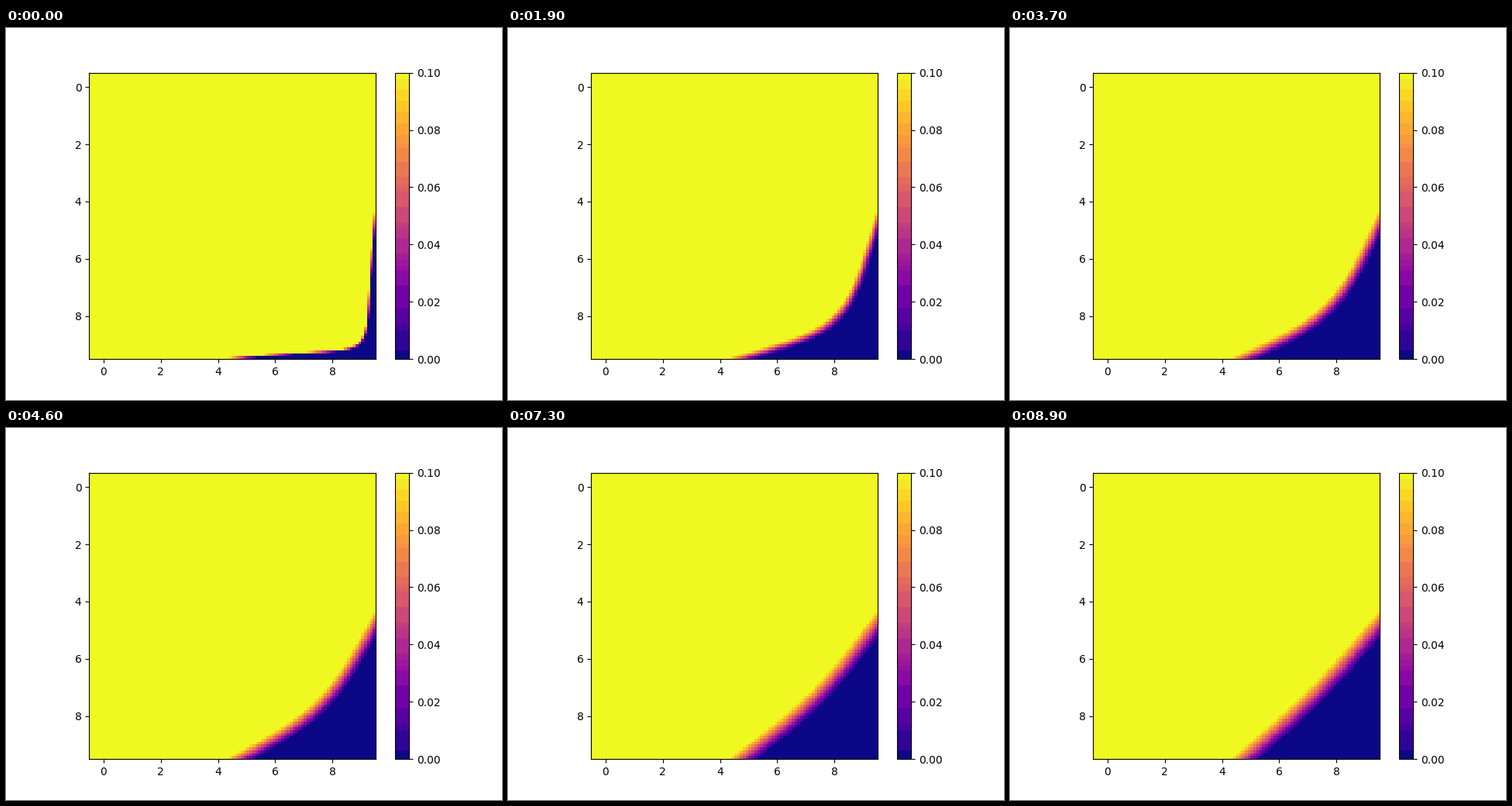
Animation of 640x480 px, one loop 9 s. Source, as a matplotlib script:

```python
import numpy as np
import matplotlib.pyplot as plt
from matplotlib.animation import FuncAnimation
from matplotlib.colors import ListedColormap

N = 100          # grid cells per side
FRAMES = 90
RATE = 11.75     # diffusion per frame, in cells squared
START = 2        # frames of diffusion already done at the start


def stepped_plasma():
    """Plasma reduced to flat bands: 3 bits red, 4 bits green, 3 bits blue."""
    rgb = (plt.get_cmap("plasma")(np.arange(256))[:, :3] * 255).astype(int)
    _, band = np.unique(rgb >> [5, 4, 5], axis=0, return_inverse=True)
    band = band.ravel()
    out = np.array([rgb[band == b].mean(axis=0) for b in band])
    out[band == band[0]] = rgb[0]
    out[band == band[-1]] = rgb[-1]
    return ListedColormap(out / 255)


# Fixed walls at cos(x + y), interior starting at 1
axis = np.arange(N) / N
walls = np.cos(axis[:, None] + axis[None, :])
walls[1:-1, 1:-1] = 0

# Heat equation solved in the eigenbasis of the interior Laplacian
n = N - 2
lap = 2 * np.eye(n) - np.eye(n, k=1) - np.eye(n, k=-1)
lam, vec = np.linalg.eigh(lap)
decay = lam[:, None] + lam[None, :]
inflow = (walls[:-2, 1:-1] + walls[2:, 1:-1]
          + walls[1:-1, :-2] + walls[1:-1, 2:])
steady = vec.T @ inflow @ vec / decay
excess = vec.T @ np.ones((n, n)) @ vec - steady


def field(frame):
    t = RATE * (frame + START)
    u = walls.copy()
    u[1:-1, 1:-1] = vec @ (steady + excess * np.exp(-decay * t)) @ vec.T
    return u


fig, ax = plt.subplots(figsize=(6.4, 4.8), dpi=100)
image = ax.imshow(field(0), cmap=stepped_plasma(), vmin=0, vmax=0.1,
                  extent=(-0.5, 9.5, 9.5, -0.5), interpolation="nearest")
fig.colorbar(image)


def update(frame):
    image.set_data(field(frame))
    return [image]


anim = FuncAnimation(fig, update, frames=FRAMES, interval=100,
                     repeat=True, repeat_delay=0)
plt.show()
```
